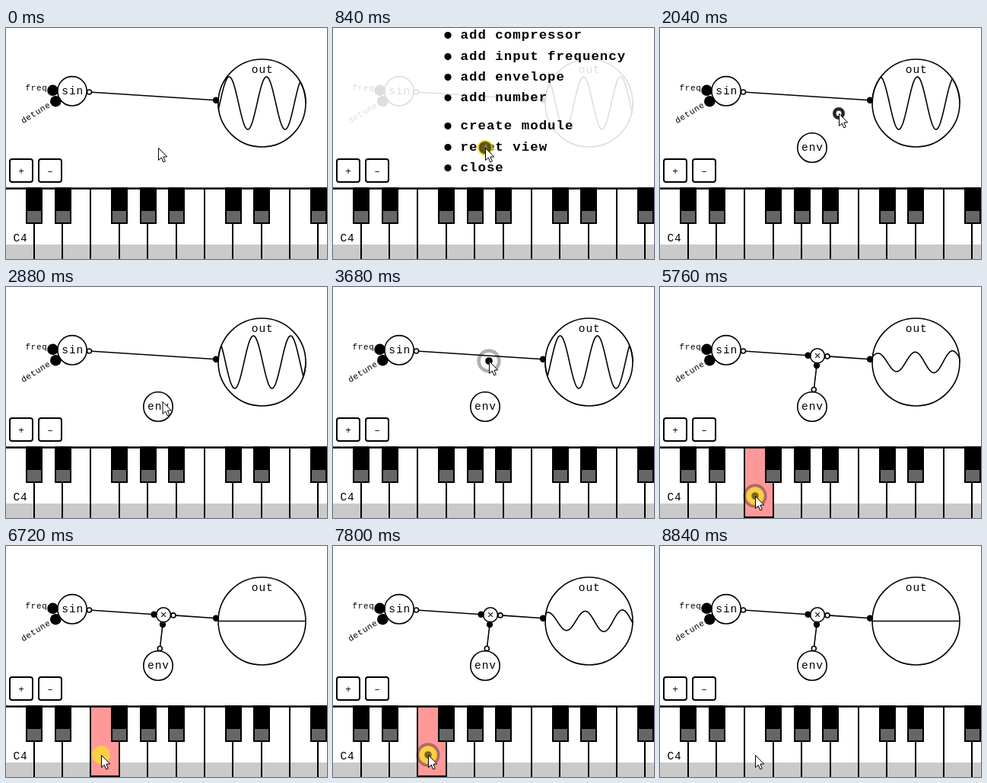
These frames come from a looping animation (422 px wide and 303 px high, 9.94 s). An HTML page with a canvas:

```html
<!DOCTYPE html>
<html lang="en">
<head>
<meta charset="utf-8">
<title>Modular synth</title>
<style>
html, body { margin: 0; width: 100%; height: 100%; overflow: hidden; background: #fff; }
canvas { display: block; width: 422px; height: 303px; }
</style>
</head>
<body>
<canvas id="stage" width="422" height="303"></canvas>
<script>
const ctx = document.getElementById('stage').getContext('2d');
const W = 422, H = 303, LOOP = 9940, STEP = 40, LAST = 8840;
const KEY_TOP = 210, KEY_W = 37.35;
const MENU_OPEN = 800, MENU_CLOSE = 2040, ENV_ADDED = 2040, MIXER_ADDED = 3720;
const FONT = '"Courier New", "Liberation Mono", monospace';

const menu = [
  ['add delay', -45], ['add filter', -18], ['add compressor', 10],
  ['add input frequency', 38], ['add envelope', 65], ['add number', 92],
  ['create module', 129], ['reset view', 157], ['close', 184]
];

// time, x, y of the pointer
const path = [
  [0, 200, 157], [1080, 200, 157], [1440, 212, 88], [1600, 222, 86],
  [1880, 235, 112], [2120, 235, 112], [2640, 208, 150], [3120, 203, 150],
  [3480, 205, 97], [4080, 205, 97], [5000, 135, 234], [5440, 125, 274], [LAST, 125, 274]
];

// start, end of the held highlight
const clicks = [
  [815, 1000], [2030, 0], [3560, 0], [5640, 6160], [6720, 7100], [7680, 8290]
];
const notes = clicks.slice(3);

const clamp = (v, a = 0, b = 1) => Math.min(b, Math.max(a, v));
const mix = (a, b, u) => a + (b - a) * u;
const ease = u => u * u * (3 - 2 * u);
const between = (t, a, b) => t >= a && t < b;

function pointerAt(t) {
  for (let i = 1; i < path.length; i++) {
    const [t0, x0, y0] = path[i - 1], [t1, x1, y1] = path[i];
    if (t <= t1) {
      const u = ease((t - t0) / (t1 - t0));
      return [mix(x0, x1, u), mix(y0, y1, u)];
    }
  }
  return path[path.length - 1].slice(1);
}

function line(x0, y0, x1, y1, width = 1.6) {
  ctx.lineWidth = width;
  ctx.strokeStyle = '#000';
  ctx.beginPath();
  ctx.moveTo(x0, y0);
  ctx.lineTo(x1, y1);
  ctx.stroke();
}

function disc(x, y, r, fill = '#000') {
  ctx.fillStyle = fill;
  ctx.beginPath();
  ctx.arc(x, y, r, 0, 7);
  ctx.fill();
}

function ring(x, y, r, width = 1.6, stroke = '#000') {
  ctx.lineWidth = width;
  ctx.strokeStyle = stroke;
  ctx.beginPath();
  ctx.arc(x, y, r, 0, 7);
  ctx.stroke();
}

function node(x, y, r) {
  disc(x, y, r, '#fff');
  ring(x, y, r);
}

// Slightly small glyphs with open spacing, like a typewriter face
function text(str, x, y, size = 16, align = 'center', weight = '') {
  const gap = size * 0.054;
  ctx.font = `${weight} ${size * 0.91}px ${FONT}`;
  ctx.letterSpacing = `${gap}px`;
  ctx.textAlign = align;
  ctx.fillStyle = '#000';
  ctx.fillText(str, x + gap / 2, y);
}

function level(t) {
  let amp = 0;
  for (const [on, off] of notes) {
    if (t < on) continue;
    const attack = clamp((t - on) / 275);
    amp = Math.max(amp, attack * clamp(1 - (t - off) / 500));
  }
  return amp;
}

function drawWave(t) {
  const cx = 336.5, cy = 98.5, R = 57.5, period = 49;
  const peak = 293.4 + t / STEP * 0.2729 * period + (t > 5000 ? 27.4 : 0);
  ctx.beginPath();
  for (let x = cx - R; x <= cx + R; x += 0.5) {
    const lag = 30 * (cx + R - x) / (2 * R);
    const amp = t < MIXER_ADDED ? 1 : level(t - lag);
    const limit = Math.sqrt(Math.max(0, R * R - (x - cx) ** 2));
    const y = -34.5 * amp * Math.cos((x - peak) / period * 2 * Math.PI);
    ctx.lineTo(x, cy + clamp(y, -limit, limit));
  }
  ctx.lineWidth = 1.6;
  ctx.strokeStyle = '#000';
  ctx.stroke();
}

function drawPatch(t) {
  if (t < MIXER_ADDED) {
    line(109.5, 84, 276, 94.7);
  } else {
    const u = ease(clamp((t - 4000) / 240));
    const x = mix(205, 207, u), y = mix(97, 90.3, u);
    line(109.5, 84, x - 12.5, y - 0.5);
    line(x + 13, y + 0.6, 276, 94.7);
    line(202.3, 134.5, x - 1, y + 12.7);
    node(x, y, 9.5);
    text('×', x, y + 5);
    disc(x - 12.5, y - 0.5, 4.2);
    disc(x - 1, y + 12.7, 4.2);
    node(x + 13, y + 0.6, 3);
    node(202.3, 134.5, 3);
  }

  node(87, 82.8, 19.2);
  text('sin', 87.3, 87);
  disc(61.5, 81.8, 7.3);
  disc(65.3, 96.2, 7.3);
  node(109.5, 84, 3);
  text('freq', 54, 82.3, 12, 'right');
  ctx.save();
  ctx.translate(59, 103);
  ctx.rotate(-0.55);
  text('detune', 0, 0, 12, 'right');
  ctx.restore();

  node(336.5, 98.5, 57.5);
  drawWave(t);
  text('out', 336.8, 59);
  disc(276, 94.8, 4.2);

  if (t >= ENV_ADDED) {
    node(200, 157, 19.2);
    text('env', 200, 161);
  }
}

function drawMenu(t, py) {
  ctx.fillStyle = 'rgba(255,255,255,.87)';
  ctx.fillRect(0, 0, W, KEY_TOP - 1);
  ctx.save();
  ctx.beginPath();
  ctx.rect(0, 0, W, KEY_TOP);
  ctx.clip();
  const shift = 47 * ease(clamp((t - 840) / 160));
  for (const [label, row] of menu) {
    const y = row + shift;
    const hover = t > 1080 && Math.abs(py - y) < 13.8;
    ctx.save();
    ctx.translate(167, y);
    if (hover) ctx.scale(1.25, 1.25);
    disc(-16, -0.4, 4.6);
    text(label, 0, 4.2, 19.1, 'left', 'bold');
    ctx.restore();
  }
  ctx.restore();
}

function drawButton(x, label) {
  ctx.beginPath();
  ctx.roundRect(x, 172, 30, 30, 3);
  ctx.fillStyle = '#fff';
  ctx.fill();
  ctx.lineWidth = 2;
  ctx.strokeStyle = '#000';
  ctx.stroke();
  text(label, x + 15, 191.5, 14);
}

function drawKeys(t) {
  ctx.fillStyle = '#fff';
  ctx.fillRect(0, KEY_TOP, W, H - KEY_TOP);
  ctx.fillStyle = '#cacaca';
  ctx.fillRect(0, 284, W, H - 284);
  if (notes.some(([on, off]) => between(t, on, off))) {
    ctx.fillStyle = '#f99';
    ctx.fillRect(3 * KEY_W, KEY_TOP, KEY_W, H - KEY_TOP);
    line(3 * KEY_W, H - 1, 4 * KEY_W, H - 1, 2);
  }
  line(0, KEY_TOP + 0.5, W, KEY_TOP + 0.5, 2.4);
  for (let i = 0; i < 12; i++) {
    const x = Math.round(i * KEY_W - 0.6);
    line(x, KEY_TOP, x, H, 2);
  }
  for (const i of [1, 2, 4, 5, 6, 8, 9, 11]) {
    const x = Math.round(i * KEY_W - 11);
    ctx.fillStyle = '#000';
    ctx.fillRect(x, KEY_TOP - 1, 22, 48);
    ctx.fillStyle = '#666';
    ctx.fillRect(x + 2, 240, 18, 15);
  }
  text('C4', 9, 280, 16, 'left');
}

function drawClick(t, x, y) {
  for (const [start, end] of clicks) {
    const age = t - start, held = between(t, start, end);
    const pulse = age > 0 && age <= 180;
    if (pulse) ring(x, y, 5 + age * 0.07, 4.6, `rgba(0,0,0,${0.9 - age / 205})`);
    if (held) disc(x, y, end === 1000 ? 10.5 : 12, 'rgba(250,230,30,.7)');
    if (pulse && held) disc(x, y, Math.max(4.8, 9 - age * 0.04), 'rgba(0,0,0,.5)');
    else if (pulse && age > 20) disc(x, y, 4.8);
  }
}

function drawPointer(x, y) {
  ctx.save();
  ctx.translate(x + 0.5, y + 0.5);
  ctx.beginPath();
  for (const [px, py] of [[0, 0], [0, 16], [3.8, 12.6], [6.2, 18.4], [8.8, 17.3], [6.4, 11.6], [11.2, 11.4]])
    ctx.lineTo(px, py);
  ctx.closePath();
  ctx.fillStyle = '#fff';
  ctx.fill();
  ctx.lineWidth = 1;
  ctx.strokeStyle = '#000';
  ctx.stroke();
  ctx.restore();
}

function draw(t) {
  const [x, y] = pointerAt(t);
  ctx.fillStyle = '#fff';
  ctx.fillRect(0, 0, W, H);
  drawPatch(t);
  if (between(t, MENU_OPEN, MENU_CLOSE)) drawMenu(t, y);
  drawKeys(t);
  drawButton(5, '+');
  drawButton(43, '–');
  drawClick(t, x, y);
  drawPointer(x, y);
}

const begin = performance.now();
function tick() {
  const t = (performance.now() - begin) % LOOP;
  draw(Math.min(LAST, Math.floor(t / STEP) * STEP));
  requestAnimationFrame(tick);
}
tick();
</script>
</body>
</html>
```
